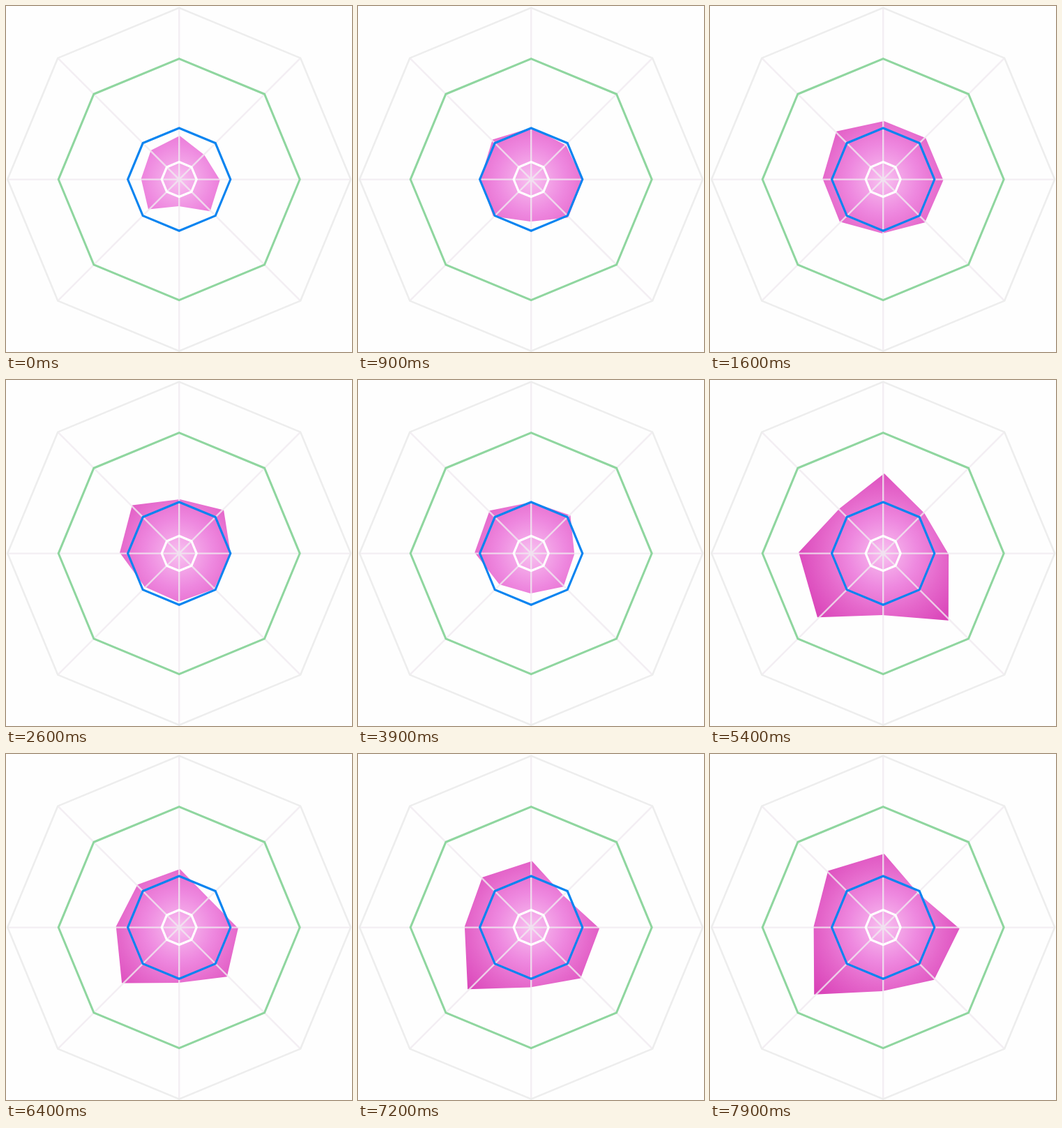
These frames come from a looping animation (496x496 px, 8000 ms). An HTML page:

```html
<!DOCTYPE html>
<html>
<head>
<meta charset="utf-8">
<style>
html, body { margin: 0; height: 100%; overflow: hidden; background: #fefefe; }
svg { display: block; width: 496px; height: 496px; }
polygon { fill: none; }
</style>
</head>
<body>
<svg viewBox="0 0 496 496">
  <defs>
    <radialGradient id="pink" gradientUnits="userSpaceOnUse" cx="0" cy="0" r="150">
      <stop offset="0" stop-color="#f8c0f0"/>
      <stop offset=".33" stop-color="#ee88df"/>
      <stop offset=".57" stop-color="#e568cb"/>
      <stop offset="1" stop-color="#d433b0"/>
    </radialGradient>
  </defs>
  <g transform="translate(248.2 248.6)">
    <polygon id="blob" style="fill:url(#pink)"/>
    <path id="spokes" stroke="#f0eaf0" stroke-opacity=".8" stroke-width="2.4"/>
    <g id="rings"></g>
  </g>
</svg>
<script>
const $ = id => document.getElementById(id);
const { sin, cos, PI } = Math;
const LOOP = 8, STEP = 0.1, TILT = 0.014;

const point = (r, a) => `${(r * sin(a)).toFixed(2)},${(-r * cos(a)).toFixed(2)}`;
const octagon = (radius, tilt = 0) =>
  Array.from({ length: 8 }, (_, i) => i * PI / 4)
    .map(a => point(radius(a), a + tilt)).join(' ');

const ring = (r, color, width) =>
  `<polygon points="${octagon(() => r)}" stroke="${color}" stroke-width="${width}"/>`;
$('rings').innerHTML = ring(246, '#ededed', 2.5) + ring(173, '#8fd69f', 3) +
  ring(25, '#fff', 3.2) + ring(73.6, '#0a84f0', 3.1);
$('spokes').setAttribute('d', [0, 1, 2, 3].map(i =>
  `M${point(246, i * PI / 4)}L${point(246, i * PI / 4 + PI)}`).join(''));

// Key poses: seconds, mean radius, upward lean, three-lobe bulge, lobe skew
const poses = [
  [0, 56, 3, 9, -2],
  [1.6, 86, 3, 0, -2],
  [2.6, 79, 10, -6, 2],
  [3.9, 71, 10, -2, 4],
  [5.4, 107, -10, 23, 6],
  [6.4, 87, -11, 13, -6],
  [7.9, 104, -7, 14, -16]
];

function poseAt(t) {
  const n = poses.findIndex(p => p[0] >= t - 1e-6) || 1;
  const a = poses[n - 1], b = poses[n];
  const mix = (t - a[0]) / (b[0] - a[0]);
  return a.map((v, i) => v + (b[i] - v) * mix);
}

// The outline is a few harmonics around the circle, drifting leftwards with time.
function outline(t) {
  const [, size, lean, bulge, skew] = poseAt(t);
  const drift = -1.4 * t;
  return a => size + lean * cos(a) + drift * sin(a)
    + bulge * cos(3 * a) + skew * sin(3 * a)
    - 3 * cos(2 * a) - 2.5 * sin(2 * a) - 2.5 * cos(4 * a);
}

function draw() {
  const t = Math.floor(performance.now() / 1000 % LOOP / STEP) * STEP;
  $('blob').setAttribute('points', octagon(outline(Math.min(t, 7.9)), TILT));
  requestAnimationFrame(draw);
}
draw();
</script>
</body>
</html>
```
